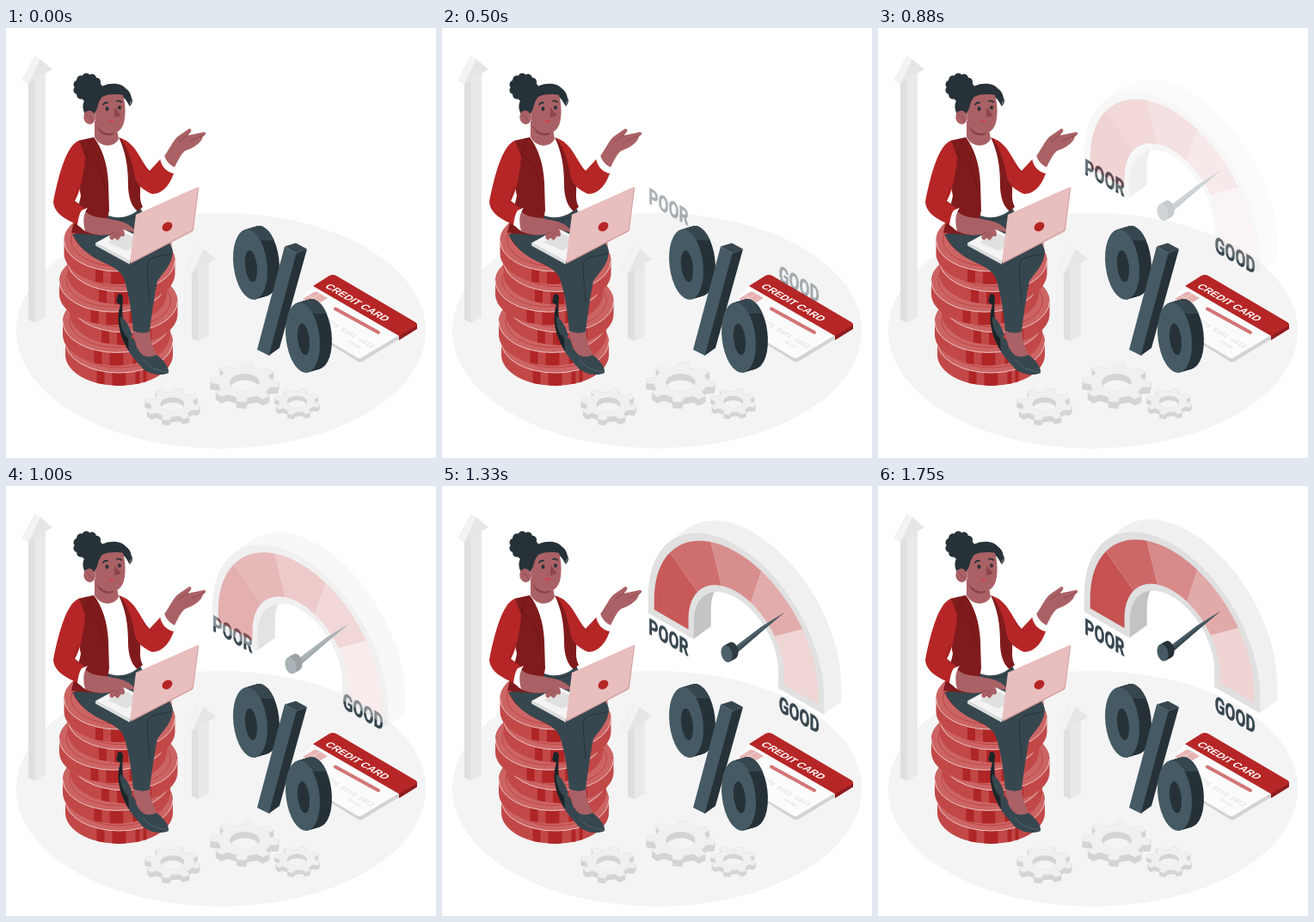
These frames come from a looping animation (500 px wide and 500 px high, 1.79 s). An HTML page with a canvas:

```html
<!DOCTYPE html>
<html lang="en">
<head>
<meta charset="utf-8">
<title>Credit score</title>
<style>
html, body { margin: 0; width: 100%; height: 100%; overflow: hidden; background: #fff; }
canvas { display: block; width: 100vw; height: 100vh; }
</style>
</head>
<body>
<canvas id="stage" width="500" height="500"></canvas>
<script>
const SIZE = 500, LOOP = 1790;
const stage = document.getElementById('stage').getContext('2d');

function makeLayer() {
  const c = document.createElement('canvas');
  c.width = c.height = SIZE;
  return c.getContext('2d');
}
const scene = makeLayer(), layer = makeLayer();
let g = scene;

const RED = '#b62626', MAROON = '#7f1b1d', SKIN = '#aa6165', SKIN_DARK = '#84434a';
const INK = '#263238', SLATE = '#37474f', STEEL = '#455a64';

function fill(color, d) { g.fillStyle = color; g.fill(new Path2D(d)); }
function line(color, width, d) {
  g.strokeStyle = color;
  g.lineWidth = width;
  g.lineCap = g.lineJoin = 'round';
  g.stroke(new Path2D(d));
}
function oval(color, x, y, rx, ry, turn = 0) {
  g.fillStyle = color;
  g.beginPath();
  g.ellipse(x, y, rx, ry, turn, 0, 7);
  g.fill();
}
function label(text, font, color, matrix, outline = 0) {
  g.save();
  g.transform(...matrix);
  g.font = font;
  g.fillStyle = g.strokeStyle = color;
  g.fillText(text, 0, 0);
  if (outline) {
    g.lineWidth = outline;
    g.strokeText(text, 0, 0);
  }
  g.restore();
}

function arrow(x, top, bottom) {
  fill('#dfdfdf', `M${x} ${top + 25}h8V${bottom + 4}l-8 -4Z`);
  fill('#e9e9e9', `M${x + 7.5} ${top + 18}h12.5V${bottom - 3}l-12.5 7Z`);
  fill('#e6e6e6', `M${x + 13} ${top + 3}l15 12.5l-28 17Z`);
  fill('#f3f3f3', `M${x + 8} ${top}l6 3.5l-14 29l-7 -4.5Z`);
  line('#e6e6e6', 0.6, `M${x + 8} ${top}l-15 28l7 4.5`);
}

function coin(cx, cy) {
  const rx = 62.5, ry = 36, h = 15;
  const side = new Path2D();
  side.ellipse(cx, cy + h, rx, ry, 0, 0, Math.PI);
  side.ellipse(cx, cy, rx, ry, 0, Math.PI, 0);
  side.closePath();
  g.save();
  g.clip(side);
  g.fillStyle = '#c24848';
  g.fillRect(cx - 70, cy - 40, 140, 100);
  g.fillStyle = '#b02525';
  for (const [x, w] of [[-26, 9], [-8, 16], [19, 5], [28, 4]]) g.fillRect(cx + x, cy - 40, w, 100);
  g.restore();
  oval('#cc6464', cx, cy, rx, ry);
  g.strokeStyle = '#f1d1d1';
  g.lineWidth = 0.9;
  g.beginPath();
  g.ellipse(cx, cy, rx, ry, 0, 0, Math.PI);
  g.stroke();
  g.strokeStyle = '#bd4141';
  g.beginPath();
  g.ellipse(cx, cy - 1, rx - 8, ry - 5, 0, 0, 7);
  g.stroke();
}

function gear(cx, cy, r, turn) {
  const h = r * 0.19, teeth = 8, p = new Path2D();
  for (let i = 0; i < teeth; i++) {
    for (const [at, k] of [[-0.27, 0.78], [-0.17, 1], [0.17, 1], [0.27, 0.78]]) {
      const a = (i + at) / teeth * 2 * Math.PI + turn;
      p.lineTo(r * k * Math.cos(a), r * k * Math.sin(a) * 0.577);
    }
  }
  p.closePath();
  g.save();
  g.translate(cx, cy + h);
  g.fillStyle = '#d4d4d4';
  for (let y = 0; y < h; y++) { g.fill(p); g.translate(0, -1); }
  g.restore();
  g.save();
  g.translate(cx, cy);
  g.fillStyle = '#f0f0f0';
  g.fill(p);
  g.strokeStyle = '#e4e4e4';
  g.lineWidth = 0.6;
  g.stroke(p);
  oval('#d4d4d4', 0, 0, r * 0.43, r * 0.25);
  g.clip();
  oval('#f4f4f4', 0, h, r * 0.43, r * 0.25);
  g.restore();
}

function ring(cx, cy) {
  const tilt = -0.12;
  const rim = color => {
    for (let i = 14; i > 0; i--) oval(color, cx + i, cy - i * 0.3, 19.5, 41, tilt);
  };
  rim(INK);
  g.save();
  g.beginPath();
  g.rect(cx - 30, cy - 60, 60, 32);
  g.clip();
  rim(SLATE);
  g.restore();
  oval(STEEL, cx, cy, 19.5, 41, tilt);
  oval(INK, cx + 1, cy + 2, 6.8, 18.5, tilt);
}

function card() {
  fill('#d3d3d3', 'M333 334L412 383L478 345V349L414 388Q411 389 408 387L333 340Z');
  fill('#fbfbfb', 'M358 299L457 357L414 383Q411 385 408 383L325 334Z');
  fill('#8e1c1e', 'M457 357L478 344V350L457 363Z');
  fill(RED, 'M357 300L376 288Q380 286 384 288L476 342Q480 345 476 347L457 358Z');
  fill('#e6b3b3', 'M345 315L358 307Q360 306 362 307L374 314L359 323Z');
  line('#f4d9d9', 0.8, 'M352 311L366 319M365 309L351 318');
  line('#d27575', 4, 'M383 326.5L433 354');
  const iso = (x, y) => [0.866, 0.5, -0.866, 0.5, x, y];
  label('CREDIT CARD', 'bold 11.8px "Liberation Sans", Arial, sans-serif', '#fff', iso(370, 301));
  label('5678 9101 1012', '8px "Liberation Mono", monospace', '#d9d9d9', iso(367, 339));
  label('00/00', '5px "Liberation Mono", monospace', '#d9d9d9', iso(397, 365));
}

function percent() {
  ring(284, 275);
  fill(STEEL, 'M324 254L338 262L306 381L292 374Z');
  fill(INK, 'M337.5 262L350 257L318 372L305.5 381Z');
  fill(SLATE, 'M324 254L337 250L350 257L338 262Z');
  ring(345, 360);
}

function legs() {
  fill('#1b2529', 'M130 310C133 308 136 310 136 314C134 330 136 350 144 362L151 373L152 378L143 376C133 360 127 340 133 322L128 319Z');
  fill(SLATE, 'M133 335C140 340 145 350 147 358L143 362C136 356 132 345 133 335Z');
  fill(SKIN, 'M147 350L168 350C167 360 169 368 176 381L162 387C154 378 150 364 147 350Z');
  fill(SLATE, 'M142 361C147 358 150 362 151 368C155 379 162 386 175 380C183 386 190 394 189 401C181 405 168 403 160 397C152 388 145 380 143 376Z');
  line('#607078', 0.7, 'M160 386C165 394 175 398 188 400');
  fill('#8f1f20', 'M78 240C83 258 105 268 128 280L130 270L86 236Z');
  fill(SLATE, 'M77 240C90 240 108 228 116 217C130 223 148 216 155 207L160 217C176 230 191 246 194 259C194 274 184 283 176 294C172 315 169 336 167 353Q158 357 148 352C146 330 142 303 136 289C129 276 110 273 98 264C88 257 82 248 77 240Z');
  line(INK, 0.9, 'M193 262C182 266 170 264 165 272C163 286 166 296 167 318M118 223C130 226 148 222 158 215');
}

function torso() {
  fill('#fff', 'M103 126C112 138 125 138 131 126C142 138 146 180 154 211C143 222 125 222 117 217C112 185 106 150 103 126Z');
  fill(MAROON, 'M84 131L102 127C112 140 118 158 119 180L120 212C118 226 112 235 108 241L76 238C80 220 85 206 87 195L80 160Z');
  line('#671416', 0.9, 'M99 129L92 146L105 157L110 168L115 184');
  fill(MAROON, 'M131 127L141 132C150 148 154 166 156 180C157 192 154 198 159 208L153 213C146 208 142 196 142 182C142 160 139 144 131 127Z');
  fill(RED, 'M133 128C151 133 157 156 167 166L180 152C184 161 190 166 195 169C191 181 183 193 170 193C160 189 153 183 150 174C147 156 143 142 133 128Z');
  line('#8e1c1e', 0.8, 'M160 160C163 164 165 167 170 169');
  fill(SKIN, 'M184 149C190 141 194 131 200 126L213 117C217 117 216 121 211 125L230 121C234 121 232 125 229 126C228 132 220 139 208 143C203 147 199 156 196 162C190 159 186 154 184 149Z');
  line(SKIN_DARK, 0.7, 'M201 132L212 124M215 131L229 125');
  fill('#fff', 'M179 151L184 148C186 156 191 162 197 164L194 169C186 167 180 160 179 151Z');
  fill(RED, 'M85 131C70 136 61 172 55 202C56 216 70 223 86 230L93 211L80 201C87 190 91 166 92 150Z');
  line('#8e1c1e', 0.8, 'M84 184L79 201L86 206');
}

function laptop() {
  fill('#dcdcdc', 'M104 250L144 270V275L104 253Z');
  fill('#f4f4f4', 'M104 250L135 233L151 241L145 271Z');
  fill('#dfe0df', 'M124 246L140 239L149 244L146 256L140 259L118 249Z');
  fill(SKIN, 'M92 213C100 222 112 219 124 223C136 224 145 229 151 236C148 238 142 236 136 234C139 239 139 244 134 242L130 247L126 244C123 249 119 245 121 240C109 242 97 240 88 234Z');
  line(SKIN_DARK, 0.7, 'M121 240L127 237M126 244L131 238');
  fill('#fff', 'M88 212L95 209C90 216 89 225 92 236L83 229C84 222 85 216 88 212Z');
  fill('#d49c9c', 'M152 217L222 185.5Q225 184.5 224 187.5L218 234Q218 236 216 237L145 274Z');
  fill('#e8bebe', 'M151 217L221 186Q224 185 223 188L217 233Q217 235 215 236L144 273Z');
  oval(RED, 187.5, 231, 6.4, 5, -0.65);
}

function head() {
  fill(SKIN, 'M103 108L103 127C110 140 126 139 131 129L129 118Z');
  fill(SKIN_DARK, 'M105 113C112 123 119 124 127 121L124 124C115 127 108 122 105 113Z');
  oval(INK, 95, 69, 13, 12);
  for (let i = 0; i < 11; i++) {
    const a = i / 11 * 2 * Math.PI;
    oval(INK, 95 + 12 * Math.cos(a), 69 + 11.5 * Math.sin(a), 5, 5);
  }
  fill(INK, 'M102 75C112 63 132 62 139 70C146 75 148 83 143 90C141 86 139 82 135 80L110 98L93 102C87 92 88 82 102 75Z');
  line(INK, 1.5, 'M141 79C148 81 147 87 144 90');
  oval(SKIN, 97, 104, 6.7, 8, -0.2);
  fill(SKIN, 'M103 98C107 96 106 86 112 80C120 76 131 77 136 78C139 88 139 99 138 105C137 115 132 122 124 122C114 122 107 115 104 109Z');
  fill('#8f454b', 'M126 92L134 102L126 104Z');
  line(INK, 1.8, 'M113 89Q115 86 118 87M129 85Q132 84 134 86');
  oval(INK, 117.5, 94, 2, 2.4);
  oval(INK, 132, 92.5, 1.9, 2.3);
  fill('#c94850', 'M119 108Q122 106 126 107Q125 111 121 110Z');
  line(SKIN_DARK, 0.7, 'M94 101Q98 102 100 108');
}

function drawScene() {
  g = scene;
  g.fillStyle = '#fff';
  g.fillRect(0, 0, SIZE, SIZE);
  oval('#f4f4f4', 250, 352, 238, 137);
  arrow(26, 32.5, 339);
  arrow(216, 253, 360.5);
  gear(193.5, 437.5, 32.5, 0.25);
  gear(277.5, 412, 40, 0.1);
  gear(338.5, 434.5, 27, 0.3);
  card();
  percent();
  [131.5, 128.5, 137, 124.5, 134, 130].forEach((x, i) => coin(x, 365 - i * 23.6));
  legs();
  torso();
  laptop();
  head();
}

// Isometric arch standing on short legs
const HUB = { x: 342, y: 185.5 };
const project = (u, v) => [HUB.x + 0.866 * u, HUB.y + 0.5 * u - v];

function arc(path, r, from, to) {
  const n = 60;
  for (let i = 0; i <= n; i++) {
    const a = from + (to - from) * i / n;
    path.lineTo(...project(-r * Math.cos(a), r * Math.sin(a)));
  }
}
function arch(r, leg) {
  const p = new Path2D();
  p.moveTo(...project(-r, -leg));
  arc(p, r, 0, Math.PI);
  p.lineTo(...project(r, -leg));
  return p;
}
function archBand(outer, inner, leg) {
  const p = arch(outer, leg);
  p.lineTo(...project(inner, -leg));
  arc(p, inner, Math.PI, 0);
  p.lineTo(...project(-inner, -leg));
  p.closePath();
  return p;
}

const OUTER = 118, INNER = 57, LEG = 20;
const body = archBand(OUTER, INNER, LEG);
const opening = arch(INNER, LEG);
const dial = archBand(110, 64, 12);

function extrude(color) {
  const depth = 20, rise = 0.73;
  g.save();
  g.translate(depth, -depth * rise);
  g.fillStyle = color;
  for (let i = 0; i <= depth * 2; i++) {
    g.fill(body);
    g.translate(-0.5, rise / 2);
  }
  g.restore();
}

function drawGauge() {
  extrude('#f0f0f0');
  g.save();
  g.clip(opening);
  extrude('#c3c3c3');
  g.restore();
  g.fillStyle = '#e0e0e0';
  g.fill(body);

  g.save();
  g.clip(dial);
  const step = Math.PI / 5;
  ['#c65252', '#cd6868', '#d88989', '#e2a9a9', '#f0d4d4'].forEach((color, i) => {
    const p = new Path2D();
    p.moveTo(HUB.x, HUB.y);
    if (i === 0) {
      p.lineTo(...project(0, -90));
      p.lineTo(...project(-150, -90));
    }
    arc(p, 150, i * step, (i + 1) * step);
    if (i === 4) {
      p.lineTo(...project(150, -90));
      p.lineTo(...project(0, -90));
    }
    g.fillStyle = color;
    g.fill(p);
  });
  g.restore();

  fill(STEEL, 'M340 186L371 162.5L398.5 145.5L374 166L344 192Z');
  fill(SLATE, 'M342 189L398.5 145.5L374 166L344 192Z');
  for (let i = 7; i > 0; i--) oval(INK, 331 + i, 194 - i * 0.55, 6.3, 10, -0.25);
  oval(STEEL, 331, 194, 6.3, 10, -0.25);
}

function drawWords() {
  const font = 'bold 25.5px Roboto, "Liberation Sans", sans-serif';
  const wall = (x, y) => [0.68, 0.392, 0, 1, x, y];
  label('POOR', font, SLATE, wall(240.3, 171.5), 0.6);
  label('GOOD', font, SLATE, wall(391.8, 261.5), 0.6);
}

// cubic-bezier(.36, -.01, .5, 1.38)
function ease(x) {
  if (x <= 0) return 0;
  if (x >= 1) return 1;
  const curve = (s, a, b) => 3 * (1 - s) ** 2 * s * a + 3 * (1 - s) * s * s * b + s ** 3;
  let lo = 0, hi = 1;
  for (let i = 0; i < 30; i++) {
    const mid = (lo + hi) / 2;
    if (curve(mid, 0.36, 0.5) < x) lo = mid; else hi = mid;
  }
  return curve(lo, -0.01, 1.38);
}

function slideUp(draw, progress, distance) {
  if (progress <= 0) return;
  g = layer;
  g.clearRect(0, 0, SIZE, SIZE);
  g.save();
  g.translate(0, distance * (1 - progress));
  draw();
  g.restore();
  stage.globalAlpha = Math.min(1, progress);
  stage.drawImage(layer.canvas, 0, 0);
  stage.globalAlpha = 1;
}

const start = performance.now();

function frame() {
  const t = (performance.now() - start) % LOOP;
  stage.drawImage(scene.canvas, 0, 0);
  slideUp(drawWords, ease((t - 155) / 1000), 55);
  slideUp(drawGauge, ease((t - 565) / 1200), 27);
  requestAnimationFrame(frame);
}

drawScene();
frame();
</script>
</body>
</html>
```
